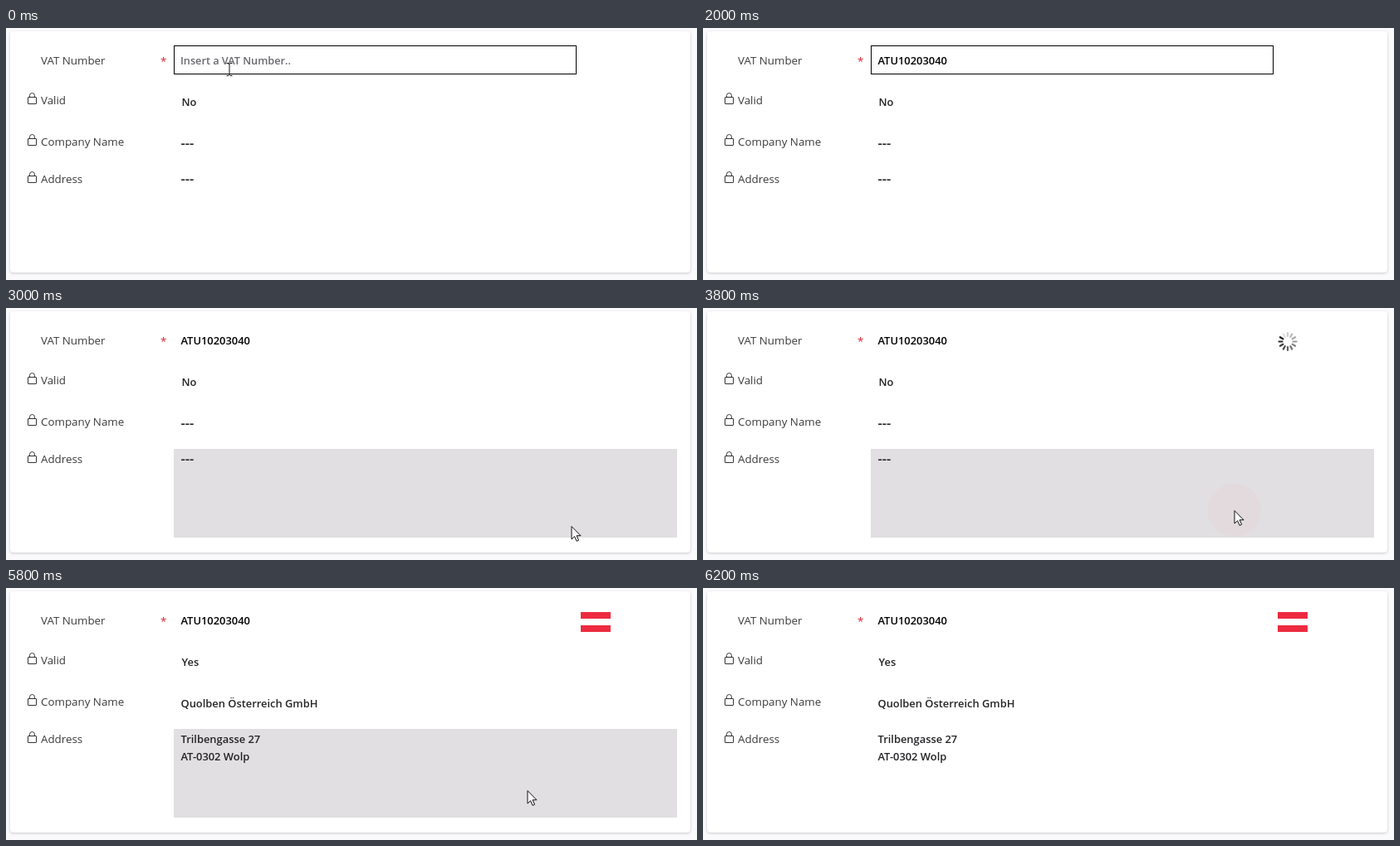
An HTML page for the animation above (8 s loop, 832 by 304 pixels).

```html
<!DOCTYPE html>
<html lang="en">
<head>
<meta charset="utf-8">
<title>VAT check form</title>
<style>
html, body { margin: 0; height: 100%; overflow: hidden; background: #faf9fc; }
svg { display: block; width: 832px; height: 304px; }
text { font: 13.35px "Open Sans", "Noto Sans", sans-serif; fill: #3b3a3c; }
.value { font-size: 12.9px; font-weight: 600; fill: #242326; }
.card { fill: #fff; filter: drop-shadow(0 1px 1.5px #0003); }
.line { fill: none; stroke: #333; }
</style>
</head>
<body>
<svg viewBox="0 0 832 304">
  <defs>
    <g id="lock" class="line">
      <rect x=".5" y="5.5" width="10" height="8" rx=".5"/>
      <path d="M2.5 5.5V3.5a3 3 0 0 1 6 0v2"/>
    </g>
  </defs>
  <rect class="card" x="5" y="4" width="819" height="291" rx="4"/>
  <rect id="hover" x="202" y="170" width="606" height="107" fill="#e1dfe1"/>
  <rect id="field" x="202.5" y="21.5" width="484" height="34" fill="#fff" stroke="#000"/>

  <text x="42" y="44">VAT Number</text>
  <text x="186" y="45" style="fill:#d8202c">*</text>
  <text x="42" y="92">Valid</text>
  <text x="42" y="142">Company Name</text>
  <text x="42" y="187">Address</text>
  <use href="#lock" x="26" y="78"/>
  <use href="#lock" x="26" y="128"/>
  <use href="#lock" x="26" y="173"/>

  <text id="hint" class="value" x="210" y="44" style="fill:#69666c;font-size:12.7px">Insert a VAT Number..</text>
  <text id="number" class="value" x="210.5" y="44" style="fill:#000">ATU10203040</text>
  <text id="valid" class="value" x="211.5" y="94">No</text>
  <g id="empty">
    <text class="value" x="210.5" y="144.5" style="font-size:16.5px">---</text>
    <text class="value" x="210.5" y="187.5" style="font-size:16.5px">---</text>
  </g>
  <g id="result">
    <text class="value" x="210.5" y="144">Quolben Österreich GmbH</text>
    <text class="value" x="210.5" y="187">Trilbengasse 27</text>
    <text class="value" x="210.5" y="208">AT-0302 Wolp</text>
    <path d="M692 29h36v8h-36zM692 45h36v8h-36z" fill="#ed2b40"/>
  </g>
  <g id="spinner" transform="translate(704 40.5)" stroke-width="2.2" stroke-linecap="round"></g>
  <path id="caret" d="M210.5 30v18" stroke="#000"/>

  <g id="pointer">
    <circle id="ring" r="24" fill="#ed3b5240" stroke="#e0405070" stroke-dasharray="9 3"/>
    <circle id="glow" r="32" fill="#f0506008"/>
    <path id="beam" class="line" style="stroke:#111" d="M-3.5-7.5h2.5L0-6.5 1-7.5h2.5M0-6.5v13M-3.5 7.5h2.5L0 6.5 1 7.5h2.5"/>
    <path id="arrow" d="M.5.5v15.5l3.6-3.4 2.5 5.7 2.5-1.1-2.5-5.5h4.9z" fill="#fff" stroke="#111"/>
  </g>
</svg>
<script>
const LOOP = 8000, STEP = 200, SPOKES = 12;
const $ = id => document.getElementById(id);
const show = (id, on) => $(id).setAttribute("visibility", on ? "visible" : "hidden");

// Pointer stops: time, x, y
const path = [
  [0, 269, 50], [200, 269, 50], [600, 275, 40], [800, 257.5, 41],
  [1000, 257.5, 41], [1200, 257.5, 49], [2000, 257.5, 49],
  [2400, 400, 100], [2600, 620, 230], [2800, 721.5, 282],
  [3200, 639.5, 244], [5400, 639.5, 244], [5800, 627.5, 244], [6000, 612, 240]
];

function pointerAt(t) {
  const i = path.findIndex(p => p[0] > t);
  if (i < 0) return path.at(-1).slice(1);
  const [t0, x0, y0] = path[i - 1], [t1, x1, y1] = path[i];
  const k = (t - t0) / (t1 - t0);
  return [x0 + (x1 - x0) * k, y0 + (y1 - y0) * k];
}

const spokes = Array.from({ length: SPOKES }, (_, i) => {
  const line = document.createElementNS("http://www.w3.org/2000/svg", "path");
  line.setAttribute("d", "M0-6.5V-10.5");
  line.setAttribute("transform", `rotate(${i * 360 / SPOKES})`);
  $("spinner").append(line);
  return line;
});

function spin(t) {
  const head = Math.round(10 + (t - 3800) / 1000 * SPOKES) + 10 * SPOKES;
  spokes.forEach((line, i) => {
    const age = (head - i) % SPOKES;
    const grey = 25 + age * 18;
    line.setAttribute("stroke", `rgb(${grey},${grey},${grey})`);
  });
}

function draw(t) {
  const within = (from, to) => t >= from && t < to;
  const done = t >= 5400;
  const click = within(600, 1000) || within(3200, 3400);

  show("field", t < 2600);
  show("hint", t < 2000);
  show("number", t >= 2000);
  show("caret", within(600, 1600));
  show("hover", within(2600, 2800) || within(3000, 6200));
  show("empty", !done);
  show("result", done);
  show("spinner", within(3200, 5400));
  show("ring", click);
  show("glow", within(3400, 4600));
  show("beam", t < 2000);
  show("arrow", within(2400, 6200));
  $("valid").textContent = done ? "Yes" : "No";
  $("pointer").setAttribute("transform", `translate(${pointerAt(t)})`);
  spin(t);
}

function frame() {
  const t = performance.now() % LOOP;
  draw(Math.floor(t / STEP) * STEP);
  requestAnimationFrame(frame);
}
frame();
</script>
</body>
</html>
```
